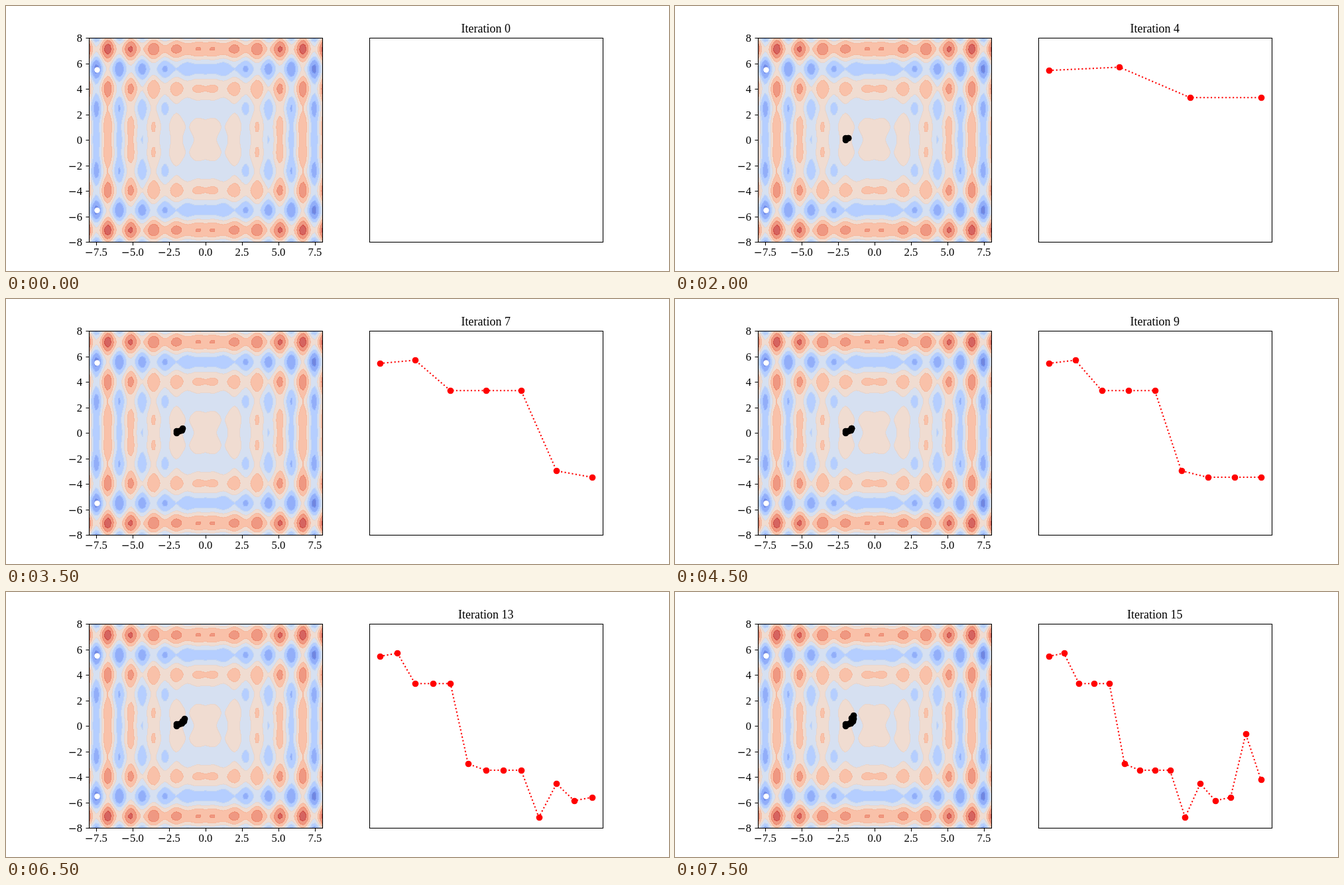
Write an HTML page with a canvas that moves like this. It is 1000 px wide and 400 px high and loops after 8 s.

```html
<!DOCTYPE html>
<html lang="en">
<head>
<meta charset="utf-8">
<title>Random search on a wavy surface</title>
<style>
html, body { margin: 0; width: 100%; height: 100%; overflow: hidden; background: #fff; }
canvas { display: block; }
</style>
</head>
<body>
<canvas id="stage" width="1000" height="400"></canvas>
<script>
const ctx = document.getElementById('stage').getContext('2d');
const STEP_MS = 500, STEPS = 16;
const SERIF = '"Liberation Serif", serif', SANS = '"DejaVu Sans", sans-serif';

const LEFT = { x: 125, y: 48, w: 352, h: 308 };
const RIGHT = { x: 548, y: 48, w: 352, h: 308 };
const toX = v => LEFT.x + (v + 8) * 22;
const toY = v => LEFT.y + (8 - v) * 19.25;

// The searched function is waveX(x) + waveY(y).
const waveX = x => x * Math.sin(4 * x);
const waveY = y => 1.1 * y * Math.sin(2 * y);
const costToY = cost => 97.2 + (1.979 - cost) / 0.0093;

// Accepted moves: x, y and how many iterations the search stays there.
const walk = [
  [-2, 0], [-2, 0.145], [-1.8267, 0.13, 3], [-1.6263, 0.23], [-1.5888, 0.364, 3],
  [-1.4795, 0.35], [-1.5552, 0.38], [-1.4917, 0.47], [-1.4653, 0.59],
  [-1.6056, 0.635], [-1.4509, 0.84]
].flatMap(([x, y, stay = 1]) => Array(stay).fill({ x, y }));

// Diverging blue-white-red map, t in 0..1: polar Lab blended through white, then to sRGB.
function divergingColor(t) {
  const d = Math.abs(2 * t - 1);
  const magnitude = 88 - 8 * d, saturation = 1.08 * d;
  const hue = t > 0.5 ? 1.061 - 0.561 * d : -1.661 + 0.561 * d;
  const chroma = magnitude * Math.sin(saturation);
  const f = (magnitude * Math.cos(saturation) + 16) / 116;
  const cube = v => v > 0.2069 ? v ** 3 : (v - 0.1379) / 7.787;
  const X = 0.9505 * cube(f + chroma * Math.cos(hue) / 500);
  const Y = cube(f);
  const Z = 1.089 * cube(f - chroma * Math.sin(hue) / 200);
  return [
    3.2406 * X - 1.5372 * Y - 0.4986 * Z,
    -0.9689 * X + 1.8758 * Y + 0.0415 * Z,
    0.0557 * X - 0.204 * Y + 1.057 * Z
  ].map(v => 255 * (1.055 * Math.max(v, 0) ** (1 / 2.4) - 0.055));
}

// Piecewise linear version of f on 100 evenly spaced samples of [-8, 8].
function sampled(f) {
  const step = 16 / 99;
  return v => {
    const a = -8 + Math.floor((v + 8) / step) * step;
    const t = (v - a) / step;
    return f(a) * (1 - t) + f(a + step) * t;
  };
}

function makeContours() {
  const { w, h } = LEFT, alpha = 0.8;
  const over = (top, under) => top.map((c, i) => c * alpha + under[i] * (1 - alpha));
  const bandColors = Array.from({ length: 8 }, (_, k) => divergingColor((k + 0.5) / 8));
  const sampleX = sampled(waveX), sampleY = sampled(waveY);
  const gx = Array.from({ length: w + 1 }, (_, i) => sampleX((i + 0.5) / 22 - 8));
  const gy = Array.from({ length: h + 1 }, (_, j) => sampleY(8 - (j + 0.5) / 19.25));
  const band = (i, j) => Math.floor((gx[i] + gy[j] + 16) / 4);

  const layer = document.createElement('canvas');
  layer.width = w;
  layer.height = h;
  const layerCtx = layer.getContext('2d');
  const image = layerCtx.createImageData(w, h);
  for (let j = 0; j < h; j++) {
    for (let i = 0; i < w; i++) {
      const near = [band(i, j), band(i + 1, j), band(i, j + 1)];
      const low = Math.min(...near), high = Math.max(...near);
      let color = over(bandColors[low], [255, 255, 255]);
      if (high > low) color = over(bandColors[high], color); // translucent bands overlap at edges
      image.data.set([...color, 255], (j * w + i) * 4);
    }
  }
  layerCtx.putImageData(image, 0, 0);
  return layer;
}

// Dots sit on pixel centres.
function dot(x, y, r, color) {
  ctx.fillStyle = color;
  ctx.beginPath();
  ctx.arc(Math.round(x) + 0.5, Math.round(y) + 0.5, r, 0, 2 * Math.PI);
  ctx.fill();
}

function frame(box) {
  ctx.strokeStyle = '#000';
  ctx.lineWidth = 1.1;
  ctx.strokeRect(box.x + 0.5, box.y + 0.5, box.w, box.h);
}

// Tick label with a wide minus; align 0.5 centres it on x, 1 ends it at x.
function label(value, digits, x, y, align) {
  const parts = [[`16.67px ${SERIF}`, Math.abs(value).toFixed(digits)]];
  if (value < 0) parts.unshift([`15.5px ${SANS}`, '\u2212']);
  const widths = parts.map(([font, text]) => {
    ctx.font = font;
    return ctx.measureText(text).width;
  });
  x -= align * widths.reduce((a, b) => a + b);
  ctx.textAlign = 'left';
  ctx.fillStyle = '#000';
  parts.forEach(([font, text], i) => {
    ctx.font = font;
    ctx.fillText(text, x, y);
    x += widths[i];
  });
}

function axes() {
  frame(LEFT);
  frame(RIGHT);
  ctx.beginPath();
  for (let v = -7.5; v <= 7.5; v += 2.5) {
    const x = toX(v) + 0.5;
    ctx.moveTo(x, 357);
    ctx.lineTo(x, 361.5);
    label(v, 1, x - 0.5, 377, 0.5);
  }
  for (let v = -8; v <= 8; v += 2) {
    const y = Math.round(toY(v)) + 0.5;
    ctx.moveTo(120.5, y);
    ctx.lineTo(125, y);
    label(v, 0, 115.2, y + 5, 1);
  }
  ctx.stroke();
}

function costChart(count) {
  const points = walk.slice(0, count).map(({ x, y }, i) => [
    count > 1 ? 563.7 + 320 * i / (count - 1) : 723.7,
    costToY(waveX(x) + waveY(y))
  ]);
  ctx.strokeStyle = '#f00';
  ctx.lineWidth = 2.08;
  ctx.setLineDash([2.08, 3.44]);
  ctx.beginPath();
  points.forEach(p => ctx.lineTo(...p));
  ctx.stroke();
  ctx.setLineDash([]);
  points.forEach(p => dot(...p, 4.86, '#f00'));
}

const contours = makeContours();

function draw(now) {
  const iteration = Math.floor(now / STEP_MS) % STEPS;
  ctx.fillStyle = '#fff';
  ctx.fillRect(0, 0, 1000, 400);
  ctx.drawImage(contours, LEFT.x, LEFT.y);
  walk.slice(0, iteration).forEach(({ x, y }) => dot(toX(x), toY(y), 4.86, '#000'));
  for (const y of [5.5, -5.5]) dot(toX(-7.45), toY(y), 4.2, '#fff');
  axes();
  costChart(iteration);
  ctx.font = `18px ${SERIF}`;
  ctx.textAlign = 'center';
  ctx.fillStyle = '#000';
  ctx.fillText(`Iteration ${iteration}`, 723.7, 40);
}

const start = performance.now();
function tick() {
  draw(performance.now() - start);
  requestAnimationFrame(tick);
}
tick();
</script>
</body>
</html>
```
